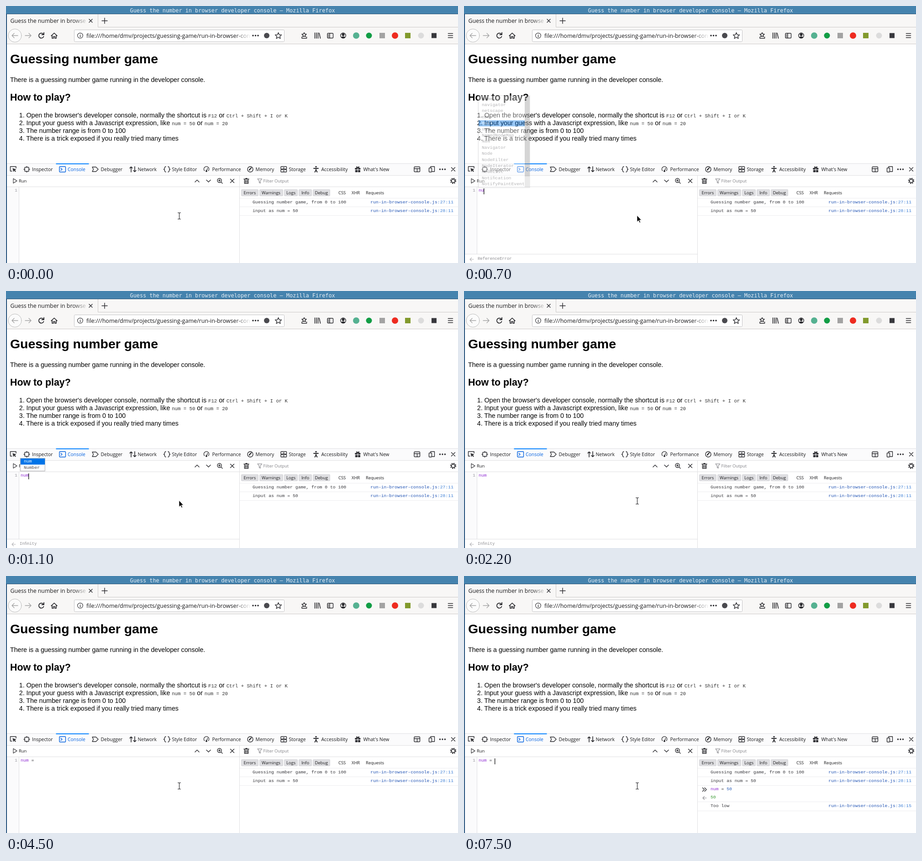
Recreate the animation shown at these times as an HTML page. Size 990 by 565 pixels, loop 8000 ms.

```html
<!DOCTYPE html>
<html lang="en">
<head>
<meta charset="utf-8">
<title>Guessing number game</title>
<style>
  html, body { margin: 0; width: 100%; height: 100%; overflow: hidden; background: #fff; }
  svg { display: block; }
  text { white-space: pre; fill: #38383d; }
  .ui text { font-family: "Open Sans", sans-serif; font-size: 10.4px; fill: #18181a; }
  .ui .small text { font-size: 9.4px; }
  .ui .chrome text { font-size: 12.5px; }
  .page text { font-family: "Liberation Sans", Arial, sans-serif; font-size: 14.17px; fill: #000; }
  .page .code { font-family: "Liberation Mono", monospace; font-size: 10.67px; fill: #333; }
  .mono text { font-family: "Liberation Mono", monospace; font-size: 9.78px; }
  .icon { fill: none; stroke: #2a2a2e; stroke-width: 1.4; stroke-linecap: round; stroke-linejoin: round; }
  .solid { fill: #2a2a2e; }
  .line { stroke: #e0e0e2; fill: none; }
  .row { stroke: #ededf0; fill: none; }
  .link, .mono text.link { fill: #2053b4; text-anchor: end; }
  .link tspan { fill: #3d7fd6; }
  .name { fill: #8f2bd3; }
  .number { fill: #2a5db8; }
</style>
</head>
<body>
<svg width="990" height="565" viewBox="0 0 990 565">
  <defs>
    <linearGradient id="tabFade" gradientUnits="userSpaceOnUse" x1="145" x2="178">
      <stop stop-color="#18181a"/><stop offset="1" stop-color="#18181a" stop-opacity=".1"/>
    </linearGradient>
    <linearGradient id="urlFade" gradientUnits="userSpaceOnUse" x1="500" x2="533">
      <stop stop-color="#18181a"/><stop offset="1" stop-color="#18181a" stop-opacity=".1"/>
    </linearGradient>
  </defs>

  <!-- window and browser chrome -->
  <rect width="990" height="565" fill="#fff"/>
  <rect y="18" width="990" height="65" fill="#f8f7f6"/>
  <rect width="990" height="17" fill="#4583ae"/>
  <rect y="17" width="990" height="1" fill="#2c5577"/>
  <rect y="17" width="2" height="548" fill="#2b5680"/>
  <text x="271.5" y="13.5" style="font:11.85px 'DejaVu Sans Mono',monospace;fill:#e6eef4">Guess the number in browser developer console – Mozilla Firefox</text>
  <path class="line" style="stroke:#cbc9c8" d="M201.5 18V46.5H990M2 83.5H990"/>
  <rect x="149.500" y="52.500" width="460" height="26" rx="2" fill="#fff" stroke="#c4c4c6"/>
  <g class="ui"><g class="chrome">
    <text x="9.500" y="37" style="font-size:12.3px;fill:url(#tabFade)">Guess the number in browse</text>
    <text x="176" y="70" style="fill:url(#urlFade)">file:///home/dmv/projects/guessing-game/run-in-browser-con</text>
  </g></g>
  <g class="icon">
    <path d="M182 29l7 7m0-7l-7 7M210 32.500h12m-6-6v12"/>
    <circle cx="19.500" cy="65" r="14.500" fill="#fbfbfb" stroke="#bbb" stroke-width="1"/>
    <path stroke="#a5a5a5" d="M26 65H13l5-5m-5 5l5 5M42 65h13l-5-5m5 5l-5 5"/>
    <path stroke-width="1.800" d="M82.500 67a5.500 5.500 0 1 1-1-5.500l1 1.500m.500-4.500v4.500h-4.500"/>
    <path stroke-width="1.700" d="M99 65.500l6.500-6 6.500 6M101 64.500v6.500h3v-4h3v4h3v-6.500"/>
    <circle cx="162.500" cy="65" r="5.800" stroke-width="1.100"/><path d="M162.500 64.500v3.500m0-6v.100"/>
    <path d="M596.500 58.500l2 4.600 5 .400-3.800 3.200 1.200 4.800-4.400-2.600-4.400 2.600 1.200-4.800-3.800-3.200 5-.400z"/>
    <path stroke-width="1.500" d="M653 58.500l1.500 3 3.500.500-2.500 2.300.500 3.200-3-1.500-3 1.500.500-3.200-2.500-2.300 3.500-.500zM648 68v3h10.500v-3"/>
    <path stroke-width="1.600" d="M676.500 59v12m3.500-12v12m3.500-12v12m2.500-11.500l2.500 11.500"/>
    <rect x="704" y="60" width="12.500" height="10.500" rx="1.500"/><path d="M709 60v10.500m-3-7.500h1m-1 2.500h1m-1 2.500h1"/>
    <path stroke-width="1.600" d="M968.500 60.500h10m-10 4.500h10m-10 4.500h10"/>
    <circle cx="738.500" cy="65" r="5.800"/>
  </g>
  <path class="solid" d="M738.500 60a3 3 0 0 1 0 6 3 3 0 0 1 0-6M734 69c2-3 7-3 9 0-2 2.500-7 2.500-9 0"/>
  <g class="solid"><circle cx="541" cy="65" r="1.800"/><circle cx="546.500" cy="65" r="1.800"/><circle cx="552" cy="65" r="1.800"/></g>
  <circle cx="571" cy="65" r="6" fill="#4a4a4f"/>
  <circle cx="767" cy="65" r="7" fill="#55b191"/>
  <circle cx="795" cy="65" r="6.500" fill="#129d45"/>
  <rect x="818" y="59" width="12" height="12" fill="#a3a3a3"/>
  <circle cx="852" cy="65" r="7" fill="#ee2b20"/>
  <rect x="874" y="59" width="12" height="12" fill="#829a2d"/>
  <circle cx="909" cy="65" r="6.500" fill="#dcdcdc"/>
  <rect x="932" y="59.500" width="11" height="11" fill="#38383d"/>

  <!-- web page -->
  <g class="page">
    <text x="9" y="126" style="font-size:28.44px;font-weight:700">Guessing number game</text>
    <text x="9" y="167">There is a guessing number game running in the developer console.</text>
    <text x="9" y="208" style="font-size:21.33px;font-weight:700">How to play?</text>
    <text x="28.800" y="245">1. Open the browser's developer console, normally the shortcut is <tspan class="code">F12</tspan> or <tspan class="code">Ctrl + Shift + I or K</tspan></text>
    <text x="28.800" y="262">2. Input your guess with a Javascript expression, like <tspan class="code">num = 50</tspan> or <tspan class="code">num = 20</tspan></text>
    <text x="28.800" y="279">3. The number range is from 0 to 100</text>
    <text x="28.800" y="296">4. There is a trick exposed if you really tried many times</text>
  </g>

  <!-- developer tools -->
  <rect x="2" y="346" width="988" height="26" fill="#fbfbfc"/>
  <path class="line" d="M2 346.500H990M2 372.500H990M2 397.500H990M511.500 372V565"/>
  <path class="row" d="M512 422.500H990M512 441.500H990M512 460.500H990"/>
  <rect x="109.500" y="346" width="72" height="2" fill="#0a84ff"/>
  <g class="ui">
    <text x="57" y="362.500">Inspector</text>
    <text x="135" y="362.500" style="fill:#0060df">Console</text>
    <text x="207.500" y="362.500">Debugger</text>
    <text x="288.500" y="362.500">Network</text>
    <text x="363.500" y="362.500">Style Editor</text>
    <text x="451.500" y="362.500">Performance</text>
    <text x="546.500" y="362.500">Memory</text>
    <text x="619.500" y="362.500">Storage</text>
    <text x="690.500" y="362.500">Accessibility</text>
    <text x="782.500" y="362.500">What's New</text>
    <g class="small">
      <text x="28" y="388">Run</text>
      <text x="563.500" y="388" style="fill:#808085">Filter Output</text>
      <g fill="#dfdfe2" stroke="#d5d5d9">
        <rect x="515.500" y="403.500" width="37" height="14" rx="1.500"/>
        <rect x="555.500" y="403.500" width="51" height="14" rx="1.500"/>
        <rect x="609.500" y="403.500" width="29" height="14" rx="1.500"/>
        <rect x="641.500" y="403.500" width="28" height="14" rx="1.500"/>
        <rect x="672.500" y="403.500" width="37" height="14" rx="1.500"/>
      </g>
      <text x="520.500" y="414">Errors</text>
      <text x="560" y="414">Warnings</text>
      <text x="614" y="414">Logs</text>
      <text x="647" y="414">Info</text>
      <text x="676.500" y="414">Debug</text>
      <text x="728" y="414">CSS</text>
      <text x="757" y="414">XHR</text>
      <text x="788" y="414">Requests</text>
    </g>
  </g>
  <g class="icon">
    <path d="M13 363h-3.500v-10h12.500v3.500"/><path class="solid" d="M15 357l7 2.500-3 1.200 2.500 3-1 .800-2.500-3-1.500 2.500z" stroke-width=".6"/>
    <rect x="41" y="354.500" width="9" height="9" rx="1"/><path d="M45.500 352.500v2m0 9v2M39 359h2m9 0h2"/>
    <g stroke="#0060df"><rect x="117" y="353" width="13.500" height="12" rx="1.500"/><path d="M120 356.500l3 2.500-3 2.500"/></g>
    <path d="M189 354h8l5 5-5 5h-8l2.500-5z"/>
    <path stroke-width="1.600" d="M274 365v-11.500l-3 3m3-3l3 3M282 353v11.500l-3-3m3 3l3-3"/>
    <path d="M350 353c-4 0-1 5.500-4.500 6 3.500.500.500 6 4.500 6M355 353c4 0 1 5.500 4.500 6-3.500.500-.500 6-4.500 6"/>
    <path d="M434.500 362a5.600 5.600 0 1 1 9 0M439 363l2.500-6"/><circle class="solid" cx="439" cy="363" r="1.200"/>
    <circle cx="535" cy="359" r="6"/><path stroke-width="2.200" d="M533 360l4-4m-4 4.500h1"/>
    <rect x="602" y="353" width="12.500" height="5.500" rx="1"/><rect x="602" y="359.500" width="12.500" height="5.500" rx="1"/><path d="M607 356h2.500m-2.500 6.500h2.500"/>
    <circle class="solid" cx="679" cy="353.500" r="1"/><path stroke-width="1.900" d="M674 357h10M679 357v3.500l-2.500 4.500m2.500-4.500l2.500 4.500"/>
    <path class="solid" d="M765 356.500h4.500v2.500h-4.500zM771.500 356.500h4.500v2.500h-4.500zM765.500 361h4v4h-4zM771.500 361h4v4h-4z" stroke-width=".8"/><path d="M770.500 355.500c-5 0-3-4 0-.500 3-3.500 5 .500 0 .500"/>
    <rect x="894" y="353.500" width="12.500" height="11" rx="1.500"/><path d="M894 357.500h12.500m-6 0v7"/>
    <path d="M930 355v-2h8.500v11h-5"/><rect x="926.500" y="356" width="6" height="9" rx="1"/>
    <path d="M975.500 355l8 8m0-8l-8 8"/>
    <path stroke-width="1.100" d="M16 379.500v10l8-5z"/>
    <path d="M414 387l4.500-4.500 4.500 4.500M439 382.500l4.500 4.500 4.500-4.500M491.500 380.500l8 8m0-8l-8 8"/>
    <circle cx="467.500" cy="383.500" r="4.500"/><path d="M471 387l3 3m-8.500-6.500h4m-2-2v4"/>
    <path stroke-width="1.600" d="M521 380.500h11m-7-1.500h3M522.500 382v8h8v-8m-5.500 1v5m3-5v5"/>
    <path stroke="#808085" stroke-width="1.100" d="M551 380h9.500l-3.500 4.500v5l-2.500-1.500v-3.500z"/>
    <circle cx="979.500" cy="384.500" r="3.800" stroke-width="1.700"/><circle cx="979.500" cy="384.500" r="5.700" stroke-width="2" stroke-linecap="butt" stroke-dasharray="2.240"/>
  </g>
  <g class="solid"><circle cx="950.500" cy="359" r="1.700"/><circle cx="956" cy="359" r="1.700"/><circle cx="961.500" cy="359" r="1.700"/></g>

  <!-- console -->
  <rect x="2" y="398" width="26" height="167" fill="#fbfbfc"/>
  <path class="line" d="M28.500 398V565"/>
  <g class="mono">
    <text x="19" y="408" style="fill:#9a9aa0">1</text>
    <text x="32" y="408"><tspan id="word" class="name"></tspan><tspan id="sign"></tspan><tspan id="digits" class="number"></tspan></text>
    <text x="540" y="434">Guessing number game, from 0 to 100</text>
    <text x="980" y="434" class="link">run-in-browser-console.js<tspan>:27:11</tspan></text>
    <text x="540" y="453">input as num = 50</text>
    <text x="980" y="453" class="link">run-in-browser-console.js<tspan>:28:11</tspan></text>
    <g id="echo">
      <path class="icon" d="M522.500 465.500l4 4-4 4m4.500-8l4 4-4 4"/>
      <text x="540" y="471"><tspan class="name">num</tspan> = <tspan class="number">50</tspan></text>
    </g>
    <g id="reply">
      <path class="icon" style="stroke:#909095;stroke-width:1.200" d="M531 488h-8l3.500-3.500m-3.500 3.500l3.500 3.500"/>
      <text x="540" y="489" style="fill:#3c9a35">50</text>
      <path class="row" d="M512 496.500H990M512 516.500H990"/>
      <text x="540" y="508">Too low</text>
      <text x="980" y="508" class="link">run-in-browser-console.js<tspan>:36:15</tspan></text>
    </g>
    <g id="preview">
      <rect x="2" y="545" width="509" height="20" fill="#fff"/>
      <path class="line" d="M2 545.500H511"/>
      <path class="icon" style="stroke:#b5b5b9;stroke-width:1.200" d="M21 557h-8l3.500-3.500m-3.500 3.500l3.500 3.500"/>
      <text id="value" x="30" y="558" style="font-size:8.89px;fill:#8c8c90"></text>
    </g>
    <rect id="caret" y="401" width="1.300" height="13" fill="#111"/>
    <g id="popup"></g>
  </g>
  <path id="beam" class="icon" style="stroke-width:1.200" d="M376.500 454.500h2l1 1 1-1h2M379.500 455.500v12M376.500 468.500h2l1-1 1 1h2"/>
  <path id="arrow" d="M379 460.500v14l3.300-3 2.300 5 2-1-2.300-4.800h4.200z" fill="#000" stroke="#fff" stroke-width=".7"/>
</svg>
<script>
const $ = id => document.getElementById(id);
const LOOP = 8000, CHAR = 5.867, ROW = 13.4;

const lists = {
  n: { selected: 4, items: 'name navigator netscape new null num NamedNodeMap NaN Navigator Node NodeFilter NodeIterator NodeList Notiﬁcation NotifyPaintEvent'.split(' ') },
  nu: { selected: 1, items: ['null', 'num', 'Number'] },
  num: { selected: 0, items: ['num', 'Number'] },
};

// Each step changes part of the state from its time on.
const steps = [
  [0, { text: '', caret: 0, list: 'n', fade: 0, value: '', arrow: 0, output: 0 }],
  [100, { caret: 1 }],
  [500, { text: 'n' }],
  [600, { arrow: 1, fade: 0.2, value: 'ReferenceError' }],
  [700, { text: 'nu', fade: 0.4 }],
  [800, { list: 'nu', fade: 0.8 }],
  [900, { fade: 1 }],
  [1000, { text: 'num' }],
  [1100, { list: 'num', value: 'Inﬁnity' }],
  [1400, { text: 'num ', fade: 0.75 }],
  [1500, { fade: 0.5 }],
  [1600, { text: 'num  ', fade: 0.2 }],
  [1700, { fade: 0, arrow: 0 }],
  [2200, { caret: 0 }],
  [2900, { caret: 1 }],
  [3400, { text: 'num ' }],
  [3600, { text: 'num =' }],
  [3700, { value: '' }],
  [3900, { text: 'num = ' }],
  [4500, { caret: 0 }],
  [4600, { text: 'num = 5', caret: 1 }],
  [4700, { text: 'num = 50' }],
  [5200, { caret: 0 }],
  [5300, { output: 1 }],
  [5400, { output: 2 }],
  [5700, { caret: 1 }],
  [6300, { text: 'num = 5' }],
  [6400, { text: 'num = ' }],
  [7000, { caret: 0 }],
  [7500, { caret: 1 }],
];

function popupMarkup({ items, selected }) {
  const width = 19 + CHAR * Math.max(...items.map(s => s.length));
  const height = items.length * ROW, top = 395 - height;
  const rows = items.map((item, i) => {
    const y = top + i * ROW, on = i === selected;
    return (on ? `<rect x="32" y="${y}" width="${width - 1}" height="${ROW}" fill="#0074e8"/>` : '') +
      `<text x="39" y="${y + 9}" style="fill:${on ? '#fff' : '#4a4a4f'}">${item}</text>`;
  });
  const scrollbar = items.length < 15 ? '' :
    `<rect x="133" y="${top}" width="11" height="${height}" fill="#ccc"/>
     <rect x="133" y="${top}" width="11" height="177" fill="#999"/>`;
  return `<rect x="30" y="${top - 1}" width="${width + 2}" height="${height + 3}" rx="1" fill="#000" opacity=".1"/>
    <rect x="31.5" y="${top - 0.5}" width="${width - 0.5}" height="${height + 1}" fill="#fff" stroke="#b8b8bc"/>` +
    rows.join('') + scrollbar;
}

const show = (id, on) => $(id).setAttribute('visibility', on ? 'visible' : 'hidden');

let shownList;
function draw() {
  const time = performance.now() % LOOP;
  const state = Object.assign({}, ...steps.filter(([start]) => start <= time).map(([, change]) => change));
  const { text, list, fade } = state;

  $('word').textContent = text.slice(0, 3);
  $('sign').textContent = text.slice(3, 6);
  $('digits').textContent = text.slice(6);
  $('caret').setAttribute('x', Math.floor(32 + CHAR * text.length));
  $('value').textContent = state.value;
  show('caret', state.caret);
  show('preview', state.value);
  show('echo', state.output > 0);
  show('reply', state.output > 1);
  show('arrow', state.arrow);
  show('beam', !state.arrow);

  if (list !== shownList) $('popup').innerHTML = popupMarkup(lists[shownList = list]);
  $('popup').setAttribute('opacity', fade);
  $('popup').setAttribute('transform', `translate(0 ${6 * (1 - fade)})`);
  requestAnimationFrame(draw);
}
draw();
</script>
</body>
</html>
```
